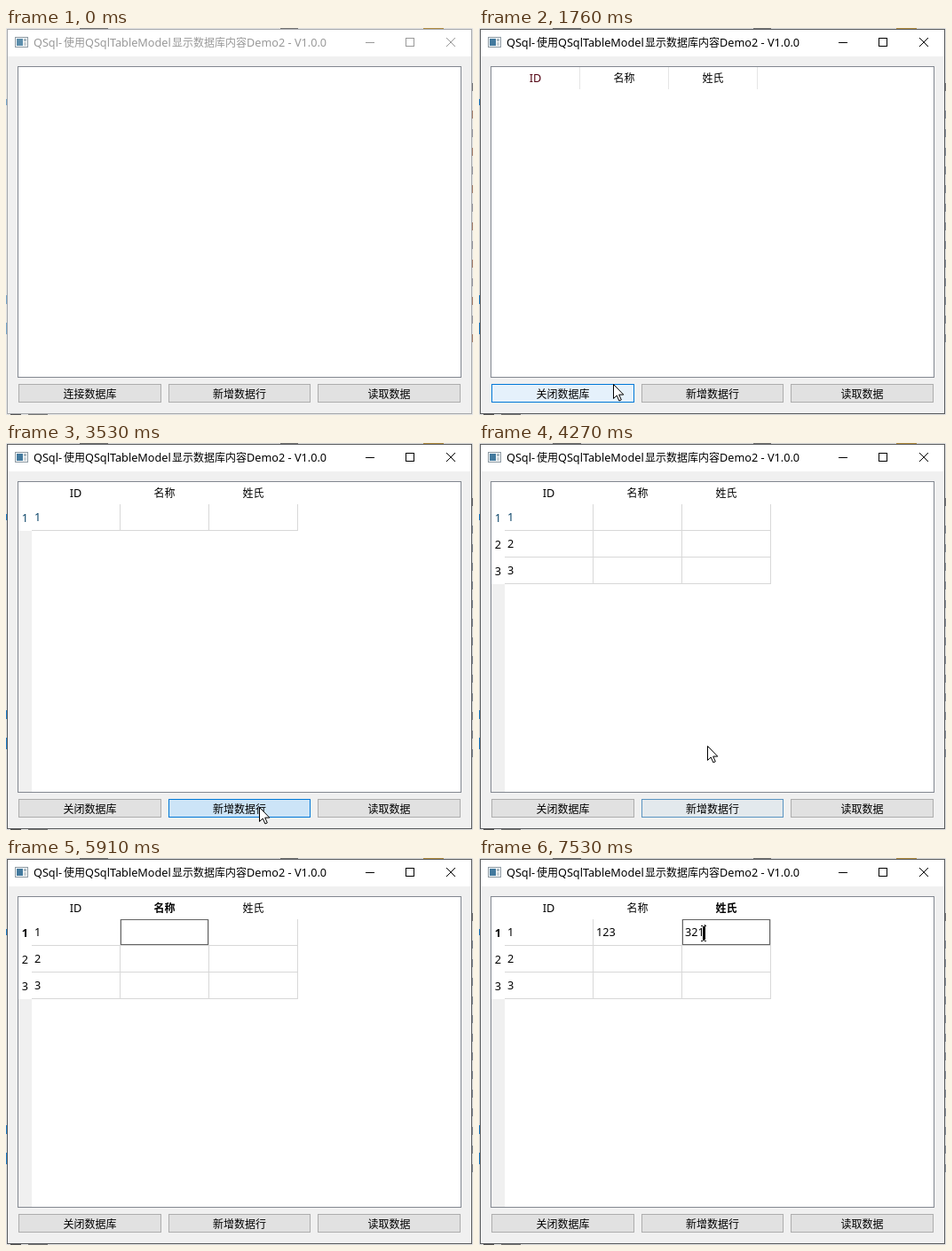
These frames come from a looping animation (526 by 436 pixels, 8000 ms). An HTML page:

```html
<!DOCTYPE html>
<html lang="zh">
<head>
<meta charset="utf-8">
<style>
html, body { margin: 0; width: 100%; height: 100%; overflow: hidden; background: #f0f0f0; }
svg { display: block; width: 526px; height: 436px; font: 12px 'Noto Sans CJK SC', 'Noto Sans CJK JP', sans-serif; }
.latin { font-family: 'Noto Sans', 'Open Sans', sans-serif; font-size: 12.7px; }
rect, .line { shape-rendering: crispEdges; }
</style>
</head>
<body>
<svg id="stage" viewBox="0 0 526 436"></svg>
<script>
const LOOP = 8000;
const stage = document.getElementById('stage');

const clamp = v => Math.max(0, Math.min(1, v));
const ramp = (t, a, b) => clamp((t - a) / (b - a));
const hex = c => [1, 3, 5].map(i => parseInt(c.slice(i, i + 2), 16));
const mix = (a, b, k) => {
  const to = hex(b);
  return '#' + hex(a).map((v, i) => Math.round(v + (to[i] - v) * k).toString(16).padStart(2, '0')).join('');
};
const rect = (x, y, w, h, fill) => `<rect x="${x}" y="${y}" width="${w}" height="${h}" fill="${fill}"/>`;
const box = (x, y, w, h, fill, stroke) =>
  `<rect x="${x + .5}" y="${y + .5}" width="${w - 1}" height="${h - 1}" fill="${fill}" stroke="${stroke}"/>`;
const text = (s, x, y, { fill = '#000', anchor = 'start', bold = false, latin = false } = {}) =>
  `<text x="${x}" y="${y}" fill="${fill}" text-anchor="${anchor}"${bold ? ' font-weight="700"' : ''}${latin ? ' class="latin"' : ''}>${s}</text>`;

// Latest entry of a [time, ...values] list
const at = (list, t) => list.filter(e => e[0] <= t).pop() || [];

// time, x, y; an entry without a place hides the pointer
const pointer = [
  [370, 141, 430], [490, 136, 420], [620, 132, 410],
  [1760, 151, 401], [1880, 188, 370], [2010, 232, 345], [2140, 270, 382], [2260, 292, 410],
  [2630, 288, 410], [2760, 285, 410],
  [4140, 270, 378], [4270, 257, 341], [4390, 234, 215], [4510, 207, 111],
  [4640, 189, 58], [4760, 187, 81], [5560],
  [6660, 243, 82], [6780, 250, 85]
];
const halos = [[890, 1140, 131, 410], [4910, 5280, 187, 81], [5410, 5560, 187, 81], [6910, 7290, 250, 85]];
const nameTyped = [[5410, ''], [6160, '1'], [6410, '12'], [6540, '123']];
const surnameTyped = [[7160, ''], [7290, '3'], [7410, '32'], [7530, '321']];
const rowTimes = [3400, 3760, 4010];

function surroundings(active) {
  let s = rect(0, 0, 526, 436, '#e6e6e6');
  for (let y = 97; y < 360; y += 21) {
    s += rect(524, y - 4, 2, 9, active ? '#8b929d' : y % 2 ? '#a9826f' : '#9b9ba4');
  }
  s += rect(524, 62, 2, 9, '#77777c');
  for (const [y, h] of [[80, 7], [301, 10], [332, 13]]) s += rect(0, y, 2, h, active ? '#2583cc' : '#78a7cb');
  for (const [x, w, c] of [[83, 32, '#777777'], [309, 20, '#777777'], [470, 23, '#b59043']]) s += rect(x, 0, w, 1, c);
  return s;
}

function frame(active) {
  const ink = active ? '#000000' : '#999999';
  const edge = active ? '#56585b' : '#a5a7aa';
  let s = box(1, 1, 524, 434, '#f0f0f0', edge) + rect(2, 2, 522, 30, '#ffffff');
  s += rect(5, 435, 12, 1, '#555555') + rect(25, 435, 22, 1, '#777777');
  s += box(10, 10, 15, 12, '#f7f9fa', '#8e9aa3') + rect(12, 12, 7, 8, active ? '#437a9e' : '#5c8eac');
  s += rect(20, 12, 3, 3, '#a9b8c0') + rect(20, 16, 3, 4, '#cbd3d6');
  const opt = { fill: ink }, lat = { fill: ink, latin: true };
  s += text('QSql-', 31, 21, lat) + text('使用', 65, 21, opt) + text('QSqlTableModel', 89, 21, lat);
  s += text('显示数据库内容', 187, 21, opt) + text('Demo2 - V1.0.0', 271, 21, lat);
  s += rect(405, 16, 10, 1, ink) + box(450, 11, 10, 10, 'none', ink);
  return s + `<path d="M496 11L506 21M506 11L496 21" stroke="${ink}" fill="none"/>`;
}

function button(label, x, w, hover = 0, press = 0) {
  const fill = mix(mix('#e1e1e1', '#e5f1fb', hover), '#cce4f7', press);
  return box(x, 401, w, 21, fill, mix('#adadad', '#0078d7', hover)) +
    text(label, x + w / 2, 416.5, { anchor: 'middle' });
}

function editor(x, value, caret) {
  const end = x + 3 + Math.round(value.length * 7.2);
  return box(x, 69, 99, 29, '#ffffff', '#646464') + text(value, x + 3, 88, { latin: true }) +
    (caret ? rect(end, 75, 1, 17, '#000') : '');
}

function selected(x) {
  return rect(x, 69, 99, 29, '#0078d7') +
    `<rect x="${x + .5}" y="69.5" width="98" height="28" fill="none" stroke="#f08728" stroke-width="1" stroke-dasharray="1 1"/>` +
    `<path class="line" d="M${x + 1} 70V97M${x + 98} 70V97" stroke="#b9672d" stroke-width="2" stroke-dasharray="2 1"/>`;
}

function table(t) {
  let s = box(13, 43, 500, 351, '#ffffff', '#828790');
  if (t < 1260) return s;
  const rows = rowTimes.filter(r => t >= r).length;
  const left = rows ? 29 : 14;
  const current = t >= 7030 ? 2 : t >= 4910 ? 1 : -1;
  if (t >= 4640 && t < 4760) s += rect(129, 44, 100, 25, '#d9ebf9');
  ['ID', '名称', '姓氏'].forEach((label, i) => {
    s += text(label, left + 49.5 + i * 100, 61, {
      anchor: 'middle', bold: i === current, latin: !i, fill: !i && !rows ? '#500010' : '#000'
    });
    if (!rows) s += rect(left + 99 + i * 100, 44, 1, 25, '#e5e5e5');
  });
  if (!rows) return s;

  const bottom = 69 + rows * 30;
  s += rect(14, bottom, 15, 393 - bottom, '#f0f0f0');
  for (let i = 0; i < 3; i++) s += rect(128 + i * 100, 69, 1, bottom - 69, '#d8d8d8');
  for (let r = 0; r < rows; r++) {
    const first = r === 0;
    const fill = first && current < 0 ? '#0b4468' : '#000';
    s += rect(29, 98 + r * 30, 300, 1, '#d8d8d8');
    s += text(r + 1, 21.5, 89 + r * 30, { anchor: 'middle', bold: first && current >= 0, latin: true, fill });
    s += text(r + 1, 32, 88 + r * 30, { latin: true, fill });
  }

  if (t >= 4760 && t < 4910) s += rect(129, 69, 99, 29, '#e5f3ff');
  if (t >= 4910 && t < 5410) s += selected(129);
  if (t >= 5410 && t < 7030) s += editor(129, at(nameTyped, t)[1], t < 5910 || t >= 6160);
  if (t >= 7030) s += text('123', 132, 88, { latin: true });
  if (t >= 7030 && t < 7160) s += selected(229);
  if (t >= 7160) s += editor(229, at(surnameTyped, t)[1], true);
  return s;
}

function cursor(t) {
  let s = '';
  for (const [from, to, x, y] of halos) {
    if (t >= from && t < to) s += `<circle cx="${x}" cy="${y}" r="12" fill="#ff0" opacity=".5"/>`;
  }
  if (t >= 7290) {
    return s + '<path class="line" d="M250 76.5H252M254 76.5H256M250 93.5H252M254 93.5H256M253 77V93" stroke="#000" stroke-width="1.4" fill="none"/>';
  }
  const [, x, y] = at(pointer, t);
  if (x === undefined) return s;
  return s + `<path transform="translate(${x + .5} ${y + .5})" d="M0 0V16L3.7 12.5L6.4 18.5L8.8 17.4L6.2 11.6H11.3Z" fill="#fff" stroke="#000"/>`;
}

function draw(t) {
  const active = t >= 890;
  const pressed = start => t < start ? 0 : 1 - ramp(t, start, start + 210);
  const hover1 = ramp(t, 370, 740) - ramp(t, 1760, 2260);
  const hover2 = ramp(t, 2010, 2260) - ramp(t, 4010, 4510);
  const press2 = Math.max(...[3260, 3530, 3880].map(pressed));
  return surroundings(active) + frame(active) + table(t) +
    button(t < 1260 ? '连接数据库' : '关闭数据库', 14, 161, hover1, pressed(890)) +
    button('新增数据行', 183, 160, hover2, press2) +
    button('读取数据', 351, 161) + cursor(t);
}

let shown = '';
const start = performance.now();
function tick() {
  const next = draw((performance.now() - start) % LOOP);
  if (next !== shown) stage.innerHTML = shown = next;
  requestAnimationFrame(tick);
}
tick();
</script>
</body>
</html>
```
